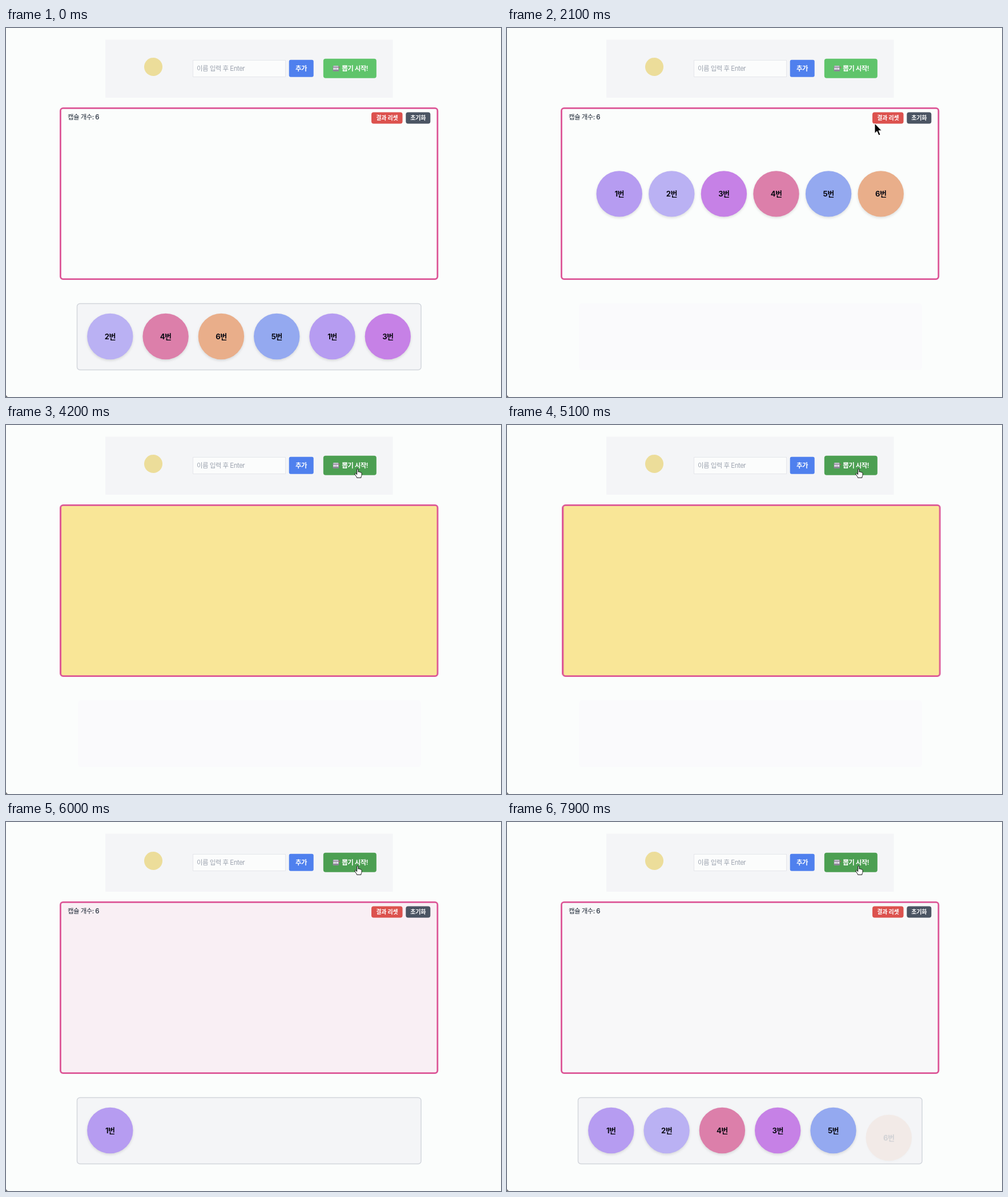
Animation of 867x646 px, one loop 8 s. Source, as an HTML page:

```html
<!DOCTYPE html>
<html lang="ko">
<head>
<meta charset="utf-8">
<title>캡슐 뽑기</title>
<style>
html, body { margin: 0; width: 100%; height: 100%; overflow: hidden; background: #fbfdfc; }
svg { display: block; width: 867px; height: 646px; }
text { font: 500 11.4px Inter, "Noto Sans CJK KR", sans-serif; letter-spacing: -.04em; fill: #1f2937; }
.mid { text-anchor: middle; }
.btn { font-weight: 600; fill: #fff; }
.small { font-size: 10px; letter-spacing: -.02em; }
.cap { filter: drop-shadow(0 2px 2px rgba(0, 0, 0, .12)); transform-box: fill-box; transform-origin: center; }
.cap text { font-size: 13px; font-weight: 700; text-anchor: middle; fill: #0b0b14; }
</style>
</head>
<body>
<svg viewBox="0 0 867 646">
  <path d="M0 642.5Q1 645 3.5 646H0Z" fill="#666"/>

  <rect x="174" y="20.5" width="503.5" height="101.5" fill="#f4f5f7"/>
  <circle cx="258" cy="68" r="16" fill="#ecdd9a"/>
  <rect x="327.5" y="56.5" width="162" height="29" fill="#fbfcfc" stroke="#e5e7eb"/>
  <text x="334" y="74.7" style="fill:#9ca3af;font-weight:400">이름 입력 후 Enter</text>
  <rect x="495.7" y="55.8" width="43" height="30" rx="3" fill="#4f80ee"/>
  <text class="mid btn" x="517" y="74.5">추가</text>
  <rect id="start" x="555.8" y="53.8" width="93" height="34" rx="4" fill="#5fc46b"/>
  <g>
    <rect x="572.5" y="66" width="10.5" height="10" rx="1.5" fill="#8d8798"/>
    <rect x="573.5" y="66" width="8.5" height="2" fill="#c9c3d3"/>
    <rect x="573.5" y="69.5" width="8.5" height="3.5" fill="#f1eef5"/>
    <path d="M576.3 69.5v3.5M579.2 69.5v3.5" stroke="#77718a" stroke-width=".7"/>
    <circle cx="584" cy="69" r="1" fill="#b85b68"/>
  </g>
  <text class="btn" x="588.3" y="74.5">뽑기 시작!</text>

  <rect x="126" y="482" width="601" height="117" rx="5" fill="#fafafc"/>
  <rect id="tray" x="124.5" y="482.5" width="602.5" height="116" rx="5" fill="#f4f5f7" stroke="#d1d5db" stroke-width="1.4"/>
  <g id="before"></g>
  <g id="after"></g>

  <g id="machine">
    <rect x="95" y="140" width="661" height="300" rx="5" fill="#fbfdfc"/>
    <rect id="grey" x="95" y="140" width="661" height="300" rx="5" fill="#f8f8f9"/>
    <rect id="pink" x="95" y="140" width="661" height="300" rx="5" fill="#dc5596"/>
    <g id="inside"></g>
    <text id="count" x="108" y="159.8">캡슐 개수: 6</text>
    <rect id="reset" x="640" y="147.5" width="54.5" height="20" rx="4" fill="#dc524e"/>
    <text class="mid btn small" x="667.3" y="161.2">결과 리셋</text>
    <rect x="700.3" y="147.5" width="43" height="20" rx="4" fill="#4b5563"/>
    <text class="mid btn small" x="721.7" y="161.2">초기화</text>
    <rect id="yellow" x="95" y="140" width="661" height="300" rx="5" fill="#f9e697"/>
    <rect x="95.4" y="140.4" width="660.4" height="299.2" rx="4.5" fill="none" stroke="#dc5596" stroke-width="2.8"/>
  </g>

  <g id="cursor">
    <path id="arrow" d="M0 0V17.5L4 13.8L7 21L10 19.8L7 12.8H12.3Z" fill="#000" stroke="#fff"/>
    <path id="hand" d="M-1.4 1C-1.4-.5.9-.5.9 1V5.3C1.3 4.3 3 4.5 3.1 5.7C3.7 4.9 5 5.2 5.1 6.4C5.8 5.8 7 6.2 7 7.4V10.5C7 12 5.8 13 5.8 15.3H-1.5C-1.7 13-4 11.4-5 9C-5.5 7.6-3.8 7-2.9 8.1L-1.4 9.8Z" fill="#fff" stroke="#111"/>
  </g>
</svg>
<script>
const LOOP = 8000;
const COLORS = ['#b69cf1', '#bab1f3', '#c681e6', '#dc7faa', '#94a9f0', '#e9ae8a'];
const $ = id => document.getElementById(id);
const move = (x, y) => ({ transform: `translate(${x}px, ${y}px)` });
const alpha = opacity => ({ opacity });
const HARD = 'steps(1, end)';

// keys: [ms, properties, easing towards the next key]
function play(el, keys) {
  const all = [[0, keys[0][1]], ...keys, [LOOP, keys[keys.length - 1][1]]];
  const anim = el.animate(
    all.map(([ms, props, easing = 'linear']) => ({ offset: ms / LOOP, easing, ...props })),
    { duration: LOOP, iterations: Infinity });
  anim.startTime = 0;
}

// visible during the given [from, to] spans only
const show = (el, ...spans) => play(el, [[0, alpha(0), HARD],
  ...spans.flatMap(([from, to]) => [[from, alpha(1), HARD], [to, alpha(0), HARD]])]);

function capsule(parent, n, x, y) {
  const g = document.createElementNS('http://www.w3.org/2000/svg', 'g');
  g.setAttribute('class', 'cap');
  g.innerHTML = `<circle cx="${x}" cy="${y}" r="40.2" fill="${COLORS[n - 1]}"/>
    <text x="${x}" y="${y + 4.8}">${n}번</text>`;
  parent.append(g);
  return g;
}

const slot = i => 182.3 + i * 97.3;

[2, 4, 6, 5, 1, 3].forEach((n, i) => capsule($('before'), n, slot(i), 540));

// drawn capsules rise one by one; the loop cuts the last one short
[1, 2, 4, 3, 5, 6].forEach((n, i) => {
  const at = 5565 + i * 459;
  const end = Math.min(at + 400, LOOP);
  const part = (end - at) / 400;
  play(capsule($('after'), n, slot(i), 540), [
    [at, { opacity: 0, ...move(0, 15) }, 'ease-out'],
    [end, { opacity: part, ...move(0, 15 * (1 - part)) }]]);
});

for (let n = 1; n <= 6; n++) {
  play(capsule($('inside'), n, 105.1 + n * 91.6, 290.4), [
    [1200, { opacity: 0, transform: 'scale(.5)' }, 'ease-out'],
    [1600, { opacity: 1, transform: 'scale(1)' }]]);
}
show($('inside'), [1190, 2850]);

play($('before'), [[1190, alpha(1)], [1600, alpha(0)]]);
play($('tray'), [[1190, alpha(1)], [1780, alpha(0)], [5530, alpha(0), HARD], [5540, alpha(1)]]);

show($('yellow'), [2850, 5540]);
play($('pink'), [[5530, alpha(0), HARD], [5540, alpha(1)], [5610, alpha(1)], [6000, alpha(.08)], [6300, alpha(0)]]);
play($('grey'), [[6000, alpha(0)], [6700, alpha(1)]]);
play($('count'), [[5530, alpha(1), HARD], [5540, alpha(.8)], [5800, alpha(1)]]);

const shake = [[2880, move(0, 0), 'ease-out']];
for (let i = 0; i < 24; i++) {
  shake.push([2935 + i * 110, move(i % 2 ? -4 : 4, 0), 'ease-in-out']);
}
play($('machine'), [...shake, [5520, move(0, 0)]]);

play($('reset'), [
  [700, { fill: '#dc524e' }], [850, { fill: '#c93f3b' }],
  [1600, { fill: '#c93f3b' }], [1750, { fill: '#dc524e' }]]);
play($('start'), [[2560, { fill: '#5fc46b' }], [2710, { fill: '#4c9f52' }]]);

play($('cursor'), [
  [95, move(846, 44), 'cubic-bezier(.3, .2, .4, 1)'], [880, move(656, 157)],
  [1500, move(656, 157), 'ease-in-out'], [1780, move(644, 175)],
  [1920, move(644, 175)], [2090, move(644, 167)],
  [2210, move(644, 167), 'ease-in-out'], [2750, move(616, 77)]]);
show($('hand'), [700, 1650], [2560, LOOP]);
show($('arrow'), [95, 700], [1650, 2560]);
</script>
</body>
</html>
```
